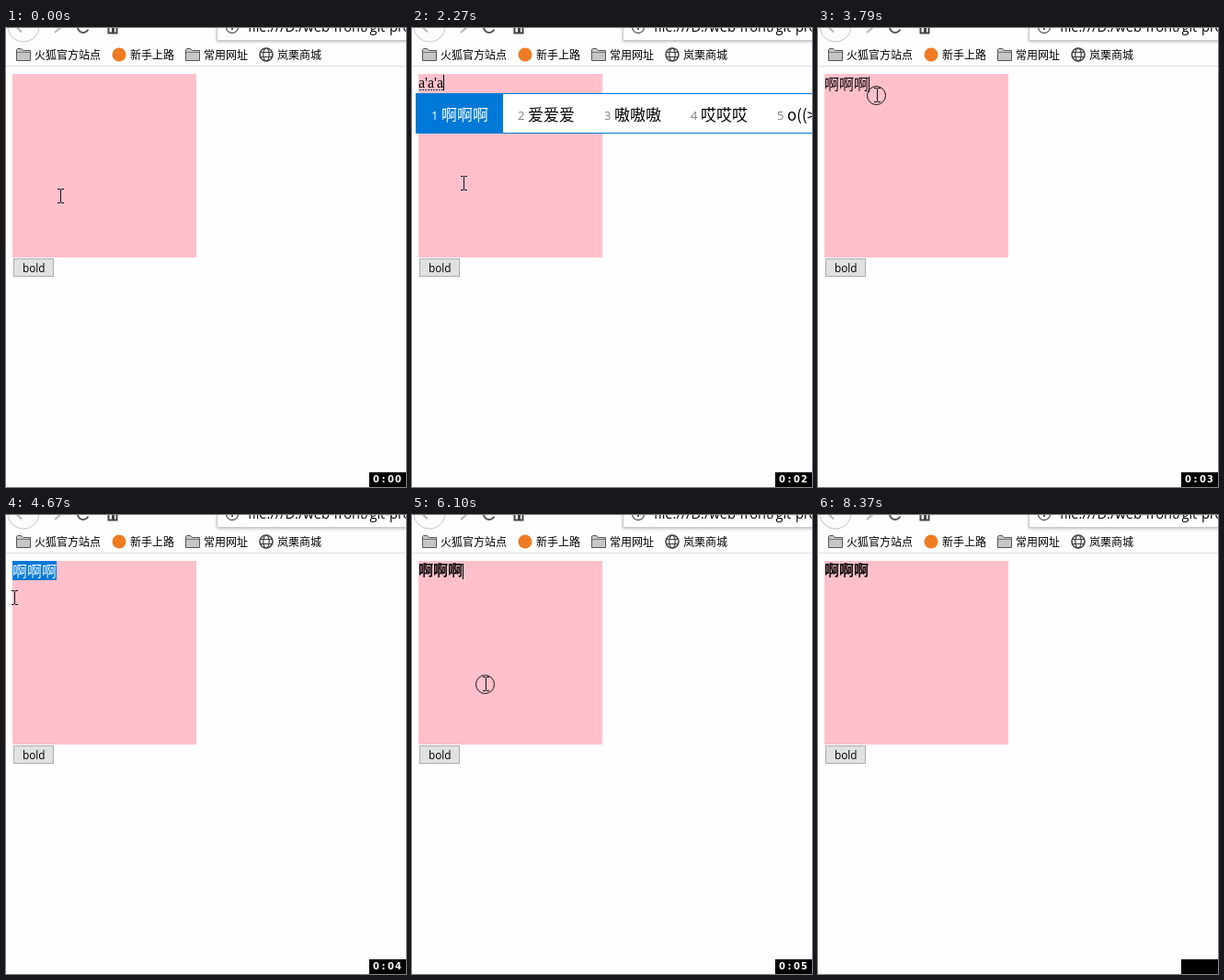
Animation of 435x500 px, one loop 8920 ms. Source, as an HTML page with a canvas:

```html
<!DOCTYPE html>
<html lang="zh-CN">
<head>
<meta charset="utf-8">
<title>Bold button</title>
<style>
html, body { margin: 0; width: 100%; height: 100%; overflow: hidden; background: #fefefe; }
canvas { display: block; width: 435px; height: 500px; }
</style>
</head>
<body>
<canvas id="stage" width="435" height="500"></canvas>
<script>
const ctx = document.getElementById('stage').getContext('2d');
const LOOP = 8920;
const BLUE = '#0078d7';
const CJK = '"Noto Sans CJK SC", "Noto Sans CJK", sans-serif';
const LATIN = '"Open Sans", sans-serif';

// Pointer: [start ms, x, y, shape]
const pointer = [
  [0, 59, 183, 'beam'], [130, 56, 169, 'beam'],
  [2840, 60, 140, 'beam'], [2970, 66, 88, 'beam'], [3090, 71, 39, 'arrow'],
  [3210, 68, 60, 'beam'], [3340, 66, 69, 'beam'], [3460, 64, 73, 'beam'],
  [3940, 38, 69, 'beam'], [4040, 18, 66, 'beam'], [4160, 8, 65, 'beam'],
  [4670, 9, 90, 'beam'], [4800, 12, 150, 'beam'], [4920, 16, 205, 'beam'],
  [5050, 19, 250, 'arrow'], [5180, 21, 261, 'arrow'],
  [5800, 45, 225, 'beam'], [5930, 74, 190, 'beam'], [6100, 80, 184, 'beam'],
  [6370, 86, 205, 'beam'], [6500, 100, 251, 'arrow'], [6620, 118, 300, 'arrow'],
  [6740, 130, 330, 'arrow'], [7050, 150, 370, 'arrow'], [7180, 190, 430, 'arrow'],
  [7300, 0, 0, 'none']
];
const presses = [[270, 400], [3790, 4550], [5430, 5550], [6100, 6220]];
const caretOn = [[270, 790], [1470, 3090], [3640, 3940], [6100, 6740], [7300, 7820]];
const ticks = [940, 2000, 3060, 4160, 5180, 6220, 7300];
const selection = [[0, 0], [3940, 1], [4040, 2], [4160, 3], [6100, 0]];
const composing = [[0, 0], [1590, 1], [2120, 2], [2270, 3], [2570, 0]];

const latest = (steps, t) => steps.filter(s => s[0] <= t).pop();
const within = (spans, t) => spans.some(([from, to]) => t >= from && t < to);

function rect(x, y, w, h, color) {
  ctx.fillStyle = color;
  ctx.fillRect(x, y, w, h);
}

function text(str, x, y, font, color = '#000') {
  ctx.font = font;
  ctx.fillStyle = color;
  ctx.fillText(str, x, y);
}

function line(points, color, width = 1) {
  ctx.beginPath();
  points.forEach(([x, y]) => ctx.lineTo(x, y));
  ctx.strokeStyle = color;
  ctx.lineWidth = width;
  ctx.stroke();
}

function ellipse(x, y, rx, ry, color, width = 1) {
  ctx.beginPath();
  ctx.ellipse(x, y, rx, ry, 0, 0, 7);
  ctx.strokeStyle = color;
  ctx.lineWidth = width;
  ctx.stroke();
}

function disc(x, y, r, color) {
  ctx.beginPath();
  ctx.arc(x, y, r, 0, 7);
  ctx.fillStyle = color;
  ctx.fill();
}

function folder(x) {
  ctx.beginPath();
  ctx.moveTo(x + .5, 35.5);
  [[.5, 23.5], [1.5, 22.5], [5.5, 22.5], [7.5, 24.5], [15.5, 24.5], [15.5, 35.5]]
    .forEach(([dx, y]) => ctx.lineTo(x + dx, y));
  ctx.closePath();
  ctx.fillStyle = '#c6c6c6';
  ctx.fill();
  ctx.strokeStyle = '#555';
  ctx.lineWidth = 1;
  ctx.stroke();
  line([[x + 1, 26.5], [x + 15, 26.5]], '#777');
}

function globe(x, y) {
  ellipse(x, y, 7, 7, '#444', 1.6);
  ellipse(x, y, 3.2, 7, '#444', 1.2);
  line([[x - 6, y - 2.5], [x + 6, y - 2.5]], '#444', 1.2);
  line([[x - 6, y + 2.5], [x + 6, y + 2.5]], '#444', 1.2);
}

function drawToolbar() {
  disc(19, -2, 17.5, '#fcfcfc');
  ellipse(19, -2, 17, 17, '#c4c4c4');
  line([[17, -6], [11.5, -1], [17, 4.5]], '#b5b5b5', 2);
  line([[12, -1], [26, -1]], '#b5b5b5', 2);
  line([[54, -6], [60, -1], [53, 5]], '#b5b5b5', 2);

  ctx.beginPath();
  ctx.arc(84, -1, 6, .45, 5.5);
  ctx.strokeStyle = '#555';
  ctx.lineWidth = 2;
  ctx.stroke();

  line([[111.5, -4], [111.5, 5.5], [120.5, 5.5], [120.5, -4]], '#444', 2);
  rect(115, 0, 3, 5, '#444');

  ctx.save();
  ctx.shadowColor = 'rgba(0,0,0,.25)';
  ctx.shadowBlur = 3;
  ctx.shadowOffsetY = 1;
  rect(229, -20, 230, 34, '#fff');
  ctx.restore();
  line([[229.5, -2], [229.5, 13.5], [436, 13.5]], '#c8c8c8');
  ellipse(246, -1, 6.5, 6.5, '#555', 1.3);
  rect(245, -2, 2, 4, '#555');
  text('file:///D:/web-front/git-project', 263, 4, '14.6px ' + LATIN);

  folder(11);
  folder(195);
  disc(123, 29, 7.5, '#ee7b22');
  globe(283, 29);
  const labels = [['火狐官方站点', 31], ['新手上路', 135], ['常用网址', 215], ['岚栗商城', 295]];
  labels.forEach(([label, x]) => text(label, x, 34, '12px ' + CJK));
  rect(0, 41, 435, 1, '#dedede');
}

function drawEditor(t) {
  rect(7, 50, 200, 200, '#ffc0cb');
  const letters = latest(composing, t)[1];
  const bold = t >= 5550;
  let caretX = 7, caretY = 51;

  if (letters) {
    const typed = Array(letters).fill('a').join("'");
    text(typed, 7, 65, '16px "Liberation Serif", serif');
    caretX = 7 + Math.round(ctx.measureText(typed).width);
    for (let x = 8; x < caretX - 1; x += 3) rect(x, 67, 2, 1, '#333');
  } else if (t >= 2570) {
    const chosen = latest(selection, t)[1];
    const split = 55 - chosen * 16;
    const font = (bold ? 'bold ' : '') + '16px ' + CJK;
    const baseline = bold ? 66 : 67;
    if (chosen) rect(split, 50, chosen * 16, 21, BLUE);
    for (let i = 0; i < 3; i++) {
      const x = 7 + i * 16;
      text('啊', x, baseline, font, x >= split ? '#fff' : '#000');
    }
    caretX = 55;
    caretY = 53;
  }
  if (within(caretOn, t)) rect(caretX, caretY, 1, 17, '#000');
}

function drawCandidates(count) {
  if (!count) return;
  const pitch = 43 + count * 17;
  rect(4, 71, 431, 44, '#fff');
  rect(4, 71, 431, 1, BLUE);
  rect(4, 114, 431, 1, BLUE);
  rect(4, 71, pitch + 1, 44, BLUE);
  const words = [...'啊爱嗷哎'].map(c => c.repeat(count));
  words.push(count === 3 ? 'o((>ω<))o' : '阿'.repeat(count));
  if (count < 3) words.push('吖'.repeat(count), '呵'.repeat(count));
  words.forEach((word, i) => {
    const x = 21 + i * pitch;
    text(i + 1, x, 100, '13px ' + LATIN, i ? '#808080' : '#fff');
    text(word, x + 11, 101, '17px ' + CJK, i ? '#000' : '#fff');
  });
}

function drawButton(t) {
  const pressed = t >= 5430 && t < 5550;
  const hover = t >= 5180 && t < 5800;
  const [fill, border] = pressed ? ['#cce4f7', '#005499']
    : hover ? ['#e5f1fb', BLUE] : ['#e1e1e1', '#adadad'];
  rect(8, 251, 44, 20, border);
  rect(9, 252, 42, 18, fill);
  text('bold', pressed ? 19 : 18, 266, '11.8px ' + LATIN);
}

function drawPointer(t) {
  const [, x, y, shape] = latest(pointer, t);
  if (within(presses, t)) ellipse(x - .5, y + .5, 10, 10, '#111');
  if (shape === 'beam') {
    rect(x, y - 7, 1, 14, '#111');
    [-8, 7].forEach(dy => {
      rect(x - 3, y + dy, 3, 1, '#111');
      rect(x + 1, y + dy, 3, 1, '#111');
    });
  } else if (shape === 'arrow') {
    ctx.beginPath();
    [[0, 0], [0, 16], [4, 12.5], [6.5, 18], [9, 17], [6.5, 11.5], [11, 11.5]]
      .forEach(([dx, dy]) => ctx.lineTo(x + dx - .5, y + dy + .5));
    ctx.closePath();
    ctx.fillStyle = '#fff';
    ctx.fill();
    ctx.strokeStyle = '#000';
    ctx.lineWidth = 1;
    ctx.stroke();
  }
}

function drawTimer(t) {
  rect(395, 484, 40, 16, '#000');
  if (t >= 8370) return;
  const seconds = ticks.filter(at => at <= t).length;
  ctx.textAlign = 'center';
  [...`0:0${seconds}`].forEach((char, i) =>
    text(char, 402.5 + i * 8, 495, 'bold 10px "DejaVu Sans", sans-serif', '#fff'));
  ctx.textAlign = 'left';
}

function render(t) {
  rect(0, 0, 435, 500, '#fefefe');
  drawToolbar();
  drawEditor(t);
  drawButton(t);
  drawCandidates(latest(composing, t)[1]);
  drawPointer(t);
  drawTimer(t);
}

const start = performance.now();
function frame() {
  render((performance.now() - start) % LOOP);
  requestAnimationFrame(frame);
}
frame();
</script>
</body>
</html>
```
